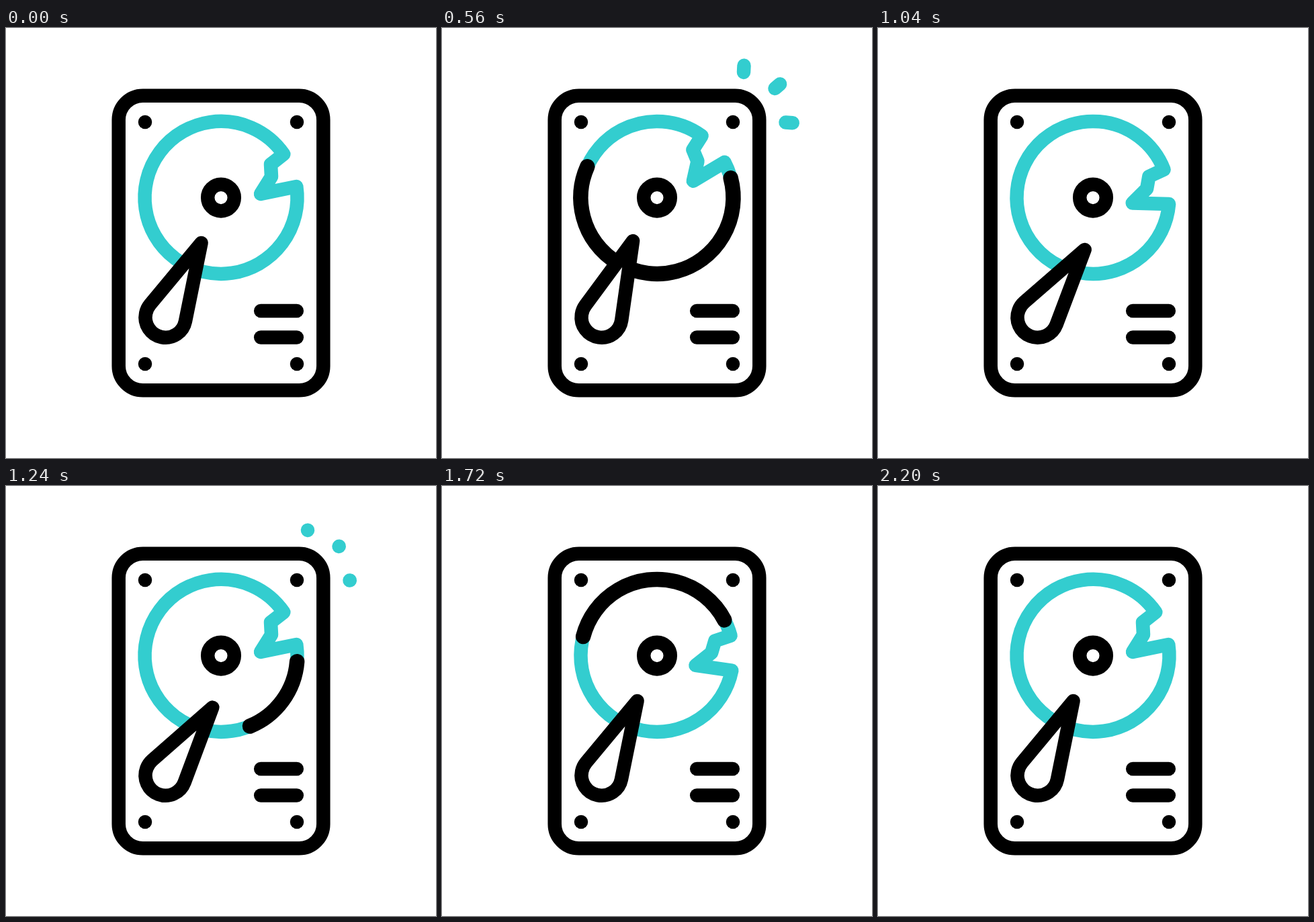
An HTML page with a canvas for the animation above (2.44 s loop, 640 px wide and 640 px high).

```html
<!DOCTYPE html>
<html lang="en">
<head>
<meta charset="utf-8">
<title>Hard disk</title>
<style>
  html, body { margin: 0; width: 100%; height: 100%; overflow: hidden; background: #fff; }
  canvas { display: block; }
</style>
</head>
<body>
<canvas id="stage" width="640" height="640"></canvas>
<script>
const ctx = document.getElementById('stage').getContext('2d');
const LOOP = 2440, STEP = 40, WIDTH = 20.5, RADIUS = 113.5;
const TEAL = '#33cdcf', BLACK = '#000';
const DEG = Math.PI / 180;

// [time, angle] keys, eased with a half cosine in between
const wobbleKeys = [[395, 0], [530, -20], [904, 20], [1245, 0], [1371, -20], [1745, 20], [2140, 0]];
const armKeys = [[200, 0], [396, -5], [1150, 10], [1590, 0]];

// start times of the two passes
const arcStarts = [266, 1155];
const sparkStarts = [418, 1235];
const sparks = [
  [449, 66, 450, 46.5],
  [495.5, 90, 510, 77.5],
  [511.5, 140.5, 531, 142]
];

const mix = (a, b, k) => a + (b - a) * k;
const ramp = (t, from, duration) => Math.min(1, Math.max(0, (t - from) / duration));

function valueAt(keys, t) {
  let value = keys[0][1];
  for (let i = 1; i < keys.length; i++) {
    const [from, a] = keys[i - 1], [to, b] = keys[i];
    if (t >= from) value = mix(a, b, (1 - Math.cos(Math.PI * ramp(t, from, to - from))) / 2);
  }
  return value;
}

function stroke(color, width, trace) {
  ctx.strokeStyle = color;
  ctx.lineWidth = width;
  ctx.beginPath();
  trace();
  ctx.stroke();
}

const line = (color, x1, y1, x2, y2) => stroke(color, WIDTH, () => {
  ctx.moveTo(x1, y1);
  ctx.lineTo(x2, y2);
});

function placed(x, y, angle, paint) {
  ctx.save();
  ctx.translate(x, y);
  ctx.rotate(angle * DEG);
  paint();
  ctx.restore();
}

function drawCase() {
  stroke(BLACK, WIDTH, () => ctx.roundRect(167.7, 100.7, 304.6, 438.6, 36));
  for (const x of [207, 433]) {
    for (const y of [140, 500]) line(BLACK, x, y, x + 0.01, y);
  }
  for (const y of [421, 460.5]) line(BLACK, 379.2, y, 432.8, y);
}

function drawDisk(t) {
  placed(320, 252.4, valueAt(wobbleKeys, t), () => {
    stroke(TEAL, WIDTH, () => {
      ctx.arc(0, 0, RADIUS, -8.3 * DEG, 325.3 * DEG);
      for (const [x, y] of [[74, -49.5], [75, -31], [59, -5.5]]) ctx.lineTo(x, y);
      ctx.closePath();
    });
    for (const start of arcStarts) {
      const head = ramp(t, start, 414), tail = ramp(t, start + 336, 414);
      if (head > tail) {
        stroke(BLACK, 22.5, () =>
          ctx.arc(0, 0, RADIUS, mix(4.5, 312.6, tail) * DEG, mix(4.5, 312.6, head) * DEG));
      }
    }
  });
  stroke(BLACK, WIDTH, () => ctx.arc(320, 252.6, 19.8, 0, 2 * Math.PI));
}

function drawArm(t) {
  placed(237.5, 430.7, 25.6 + valueAt(armKeys, t), () => {
    stroke(BLACK, WIDTH, () => {
      ctx.moveTo(0, -122.8);
      ctx.arc(0, 0, 30, -14.1 * DEG, 194.1 * DEG);
      ctx.closePath();
      ctx.fillStyle = '#fff';
      ctx.fill();
    });
  });
}

function drawSparks(t) {
  for (const start of sparkStarts) {
    const head = ramp(t, start, 270), tail = ramp(t, start + 150, 270);
    if (head <= tail) continue;
    for (const [x1, y1, x2, y2] of sparks) {
      line(TEAL, mix(x1, x2, tail), mix(y1, y2, tail), mix(x1, x2, head), mix(y1, y2, head));
    }
  }
}

const origin = performance.now();

function draw() {
  const elapsed = (performance.now() - origin) % LOOP;
  const t = Math.floor(elapsed / STEP) * STEP;
  ctx.fillStyle = '#fff';
  ctx.fillRect(0, 0, 640, 640);
  ctx.lineCap = ctx.lineJoin = 'round';
  drawCase();
  drawDisk(t);
  drawArm(t);
  drawSparks(t);
  requestAnimationFrame(draw);
}
draw();
</script>
</body>
</html>
```
